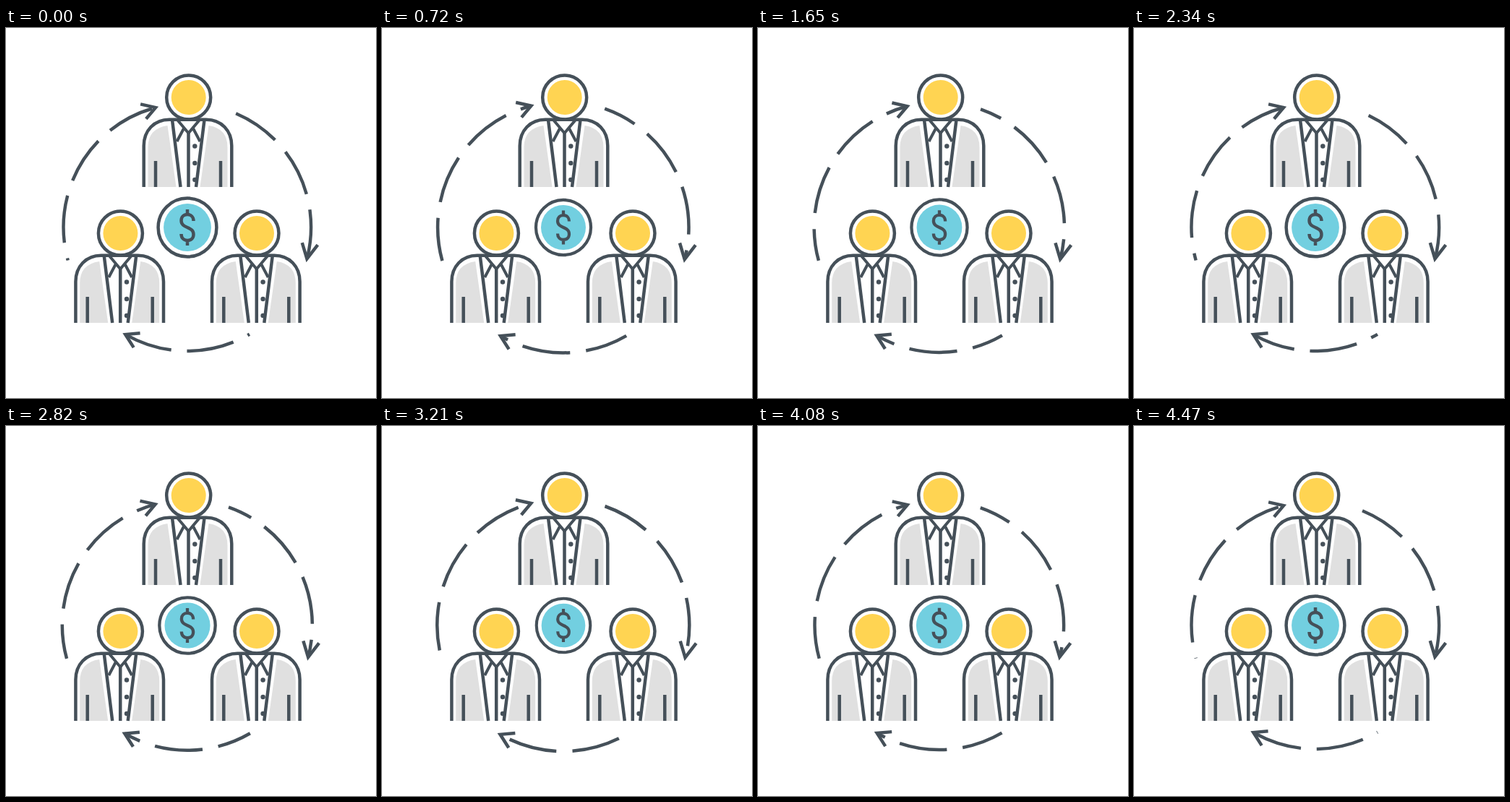
These frames come from a looping animation (512x512 px, 4.5 s). An HTML page:

```html
<!DOCTYPE html>
<html lang="en">
<head>
<meta charset="utf-8">
<title>Team cycle</title>
<style>
  html, body { margin: 0; width: 100%; height: 100%; overflow: hidden; background: #fff; }
  svg { display: block; width: 100vw; height: 100vh; }
  .line { fill: none; stroke: #455059; stroke-width: 4.5; }
</style>
</head>
<body>
<svg viewBox="0 0 512 512">
  <defs>
    <g id="person">
      <circle cx=".7" cy="96" r="24" fill="#ffd452"/>
      <path fill="#e0e0e0" d="M-55.5 220V165Q-55.5 139-28.500 135L-16.500 220ZM54.500 220V165Q54.500 139 28.500 135L16.500 220Z"/>
      <g class="line">
        <circle cx=".7" cy="96" r="30.500"/>
        <path d="M-61.300 220V163C-61.300 142-47 126.700-26 126.700H25C46 126.700 60.300 142 60.300 163V220"/>
        <path d="M-22 127L-10.500 220M22.500 127L11 220M-45 184V220M45 184V220M.5 144V220"/>
        <path stroke-width="4" d="M-15 127L.5 145.500L16 127M-15.500 157L-6 139M16.500 157L7 139"/>
      </g>
      <g fill="#455059">
        <circle cx="9.300" cy="163.500" r="3.200"/>
        <circle cx="9.300" cy="187" r="3.200"/>
        <circle cx="9.300" cy="210" r="3.200"/>
      </g>
    </g>
  </defs>
  <g id="ring" class="line"></g>
  <use href="#person" x="252"/>
  <use href="#person" x="157.700" y="188"/>
  <use href="#person" x="346.300" y="188"/>
  <g id="coin">
    <circle r="33" fill="#72cfe0"/>
    <circle class="line" r="40.500"/>
    <path class="line" d="M8.500-9C8.500-14.500 5-18 0-18S-8.500-14.500-8.500-9.500C-8.500-4-4.500-2 0 0S8.500 4 8.500 9.500 5 18 0 18-8.500 14.500-8.500 9M0-25V-18M0 18V25"/>
  </g>
</svg>
<script>
const LOOP = 4500, RADIUS = 173, DASH = 22, PERIOD = 29.3;
const ring = document.getElementById('ring');
const coin = document.getElementById('coin');

// Angles in degrees, clockwise from the top
const arcs = [
  { start: 19.3, end: 104.8, phase: 23.15, wing: 7.1 },
  { start: 149.8, end: 210, phase: 158.1, wing: 6 },
  { start: 254.5, end: 345.2, phase: 262.8, wing: 6 }
];

function point(angle, radius = RADIUS) {
  const a = angle * Math.PI / 180;
  return `${(radius * Math.sin(a)).toFixed(2)} ${(-radius * Math.cos(a)).toFixed(2)}`;
}

function addPath(d) {
  const path = document.createElementNS('http://www.w3.org/2000/svg', 'path');
  path.setAttribute('d', d);
  return ring.appendChild(path);
}

for (const arc of arcs) {
  const { start, end, wing } = arc;
  arc.path = addPath(`M${point(start)}A${RADIUS} ${RADIUS} 0 0 1 ${point(end)}`);
  arc.path.setAttribute('pathLength', end - start);
  arc.path.setAttribute('stroke-dasharray', `${DASH} ${PERIOD - DASH}`);
  addPath(`M${point(end - wing, RADIUS - 11)}L${point(end)}L${point(end - wing, RADIUS + 11)}`);
}

function draw(now) {
  const t = now % LOOP / LOOP;
  const pulse = Math.cos(4 * Math.PI * t);
  for (const { path, start, phase } of arcs) {
    const lead = (phase - start + 4 * PERIOD * t) % PERIOD;
    path.setAttribute('stroke-dashoffset', PERIOD - lead);
  }
  ring.setAttribute('transform', `translate(250.800 275.700) scale(${1 - 0.0098 * pulse})`);
  coin.setAttribute('transform', `translate(251 276) scale(${0.957 + 0.041 * pulse})`);
}

const began = performance.now();
function tick() {
  draw(performance.now() - began);
  requestAnimationFrame(tick);
}
tick();
</script>
</body>
</html>
```
